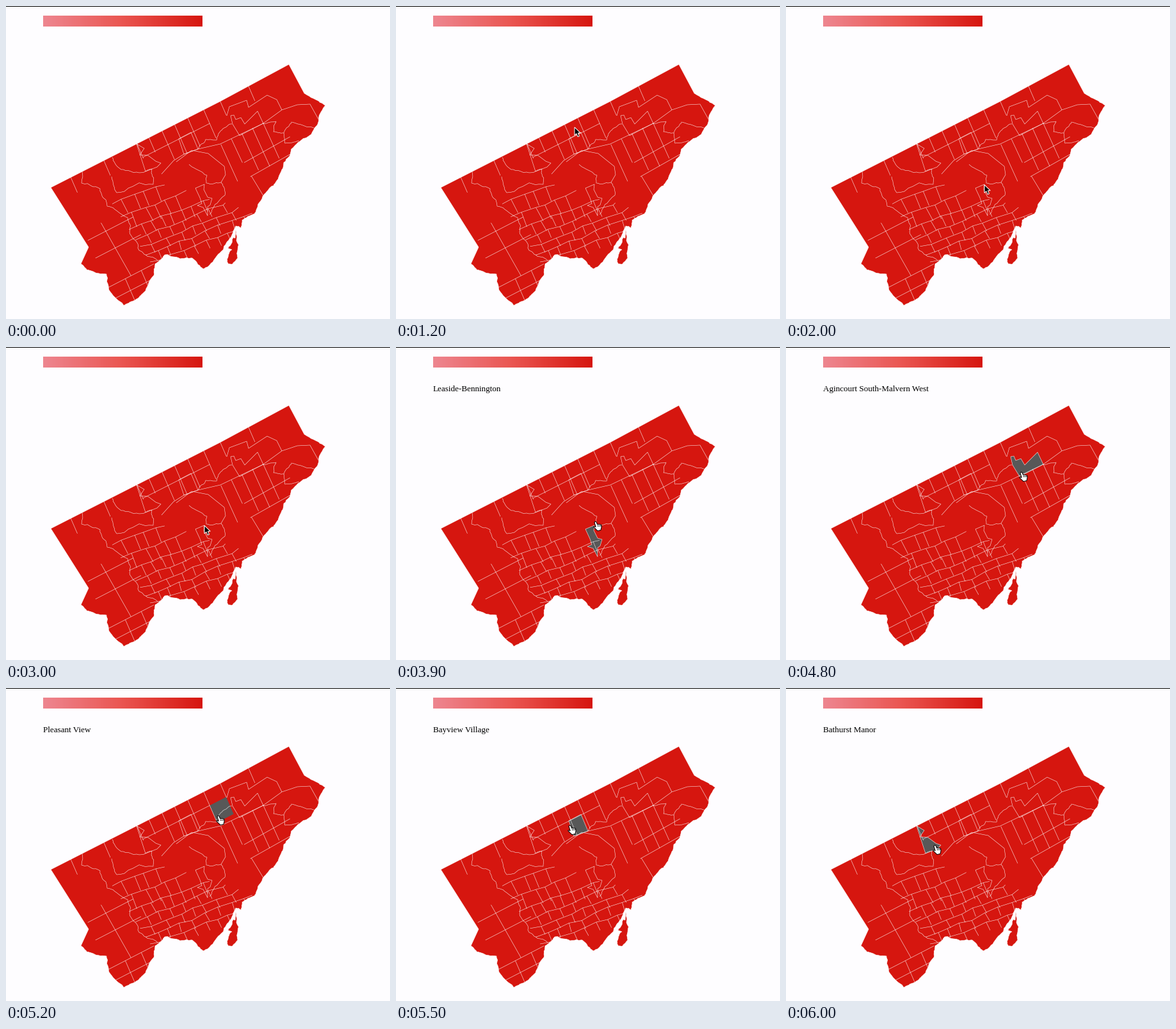
Write a matplotlib script that moves like this. It is 600 px wide and 488 px high and loops after 6.8 s.

```python
import matplotlib.pyplot as plt
import numpy as np
from matplotlib.animation import FuncAnimation
from matplotlib.collections import LineCollection
from matplotlib.colors import LinearSegmentedColormap
from matplotlib.patches import Polygon, Rectangle

W, H, DPI = 600, 488, 64
PX = 72 / DPI  # one pixel in points
RED, GREY, PAPER = "#d6160f", "#585858", "#fefdff"
FRAMES, STEP = 68, 100
rng = np.random.default_rng(4)

# Street frame: a runs along the northern border, b runs into the city
CORNER = np.array([70, 283])
AXES = np.array([[0.889, -0.458], [0.40, 0.917]])


def place(a, b):
    return CORNER + np.array([a, b]) @ AXES


def street(a0, b0, a1, b1):
    return np.array([place(a0, b0), place(a1, b1)])


def rough(pts, amp=0.06, passes=3):
    """Fractal line: shift each midpoint in proportion to its segment."""
    pts = np.array(pts, float)
    for _ in range(passes):
        span = np.diff(pts, axis=0)
        size = np.hypot(*span.T)[:, None]
        mid = pts[:-1] + span / 2 + rng.normal(0, amp, span.shape) * size
        out = np.empty((2 * len(pts) - 1, 2))
        out[::2], out[1::2] = pts, mid
        pts = out
    return pts


# City outline
border = [(129, 376), (70, 283), (204, 215), (334, 149), (442, 91), (466, 136)]
shore = [(466, 136), (484, 146), (499, 155), (488, 181), (477, 200),
         (452, 217), (434, 244), (425, 270), (418, 280), (401, 297),
         (388, 324), (369, 334), (367, 346), (359, 343), (351, 361),
         (336, 383), (318, 404), (308, 410), (291, 393), (272, 394),
         (248, 388), (233, 402), (231, 420), (218, 444), (208, 454),
         (184, 467), (161, 443), (157, 418), (140, 416), (117, 402)]
spit = [(359, 346), (361, 360), (362, 393), (347, 402), (347, 391),
        (353, 380), (347, 378), (355, 361), (358, 362)]

# Highways, creeks and valleys
highways = [
    [(243, 262), (262, 241), (278, 231), (300, 223), (335, 215), (402, 183),
     (431, 162), (455, 154), (475, 153), (489, 178)],
    [(266, 243), (290, 225), (316, 230), (341, 250), (343, 263), (336, 275)],
    [(345, 171), (349, 157), (376, 147), (379, 158), (408, 139), (423, 146),
     (431, 162)],
]
creeks = [
    [(119, 258), (118, 276), (147, 285), (158, 312), (190, 330), (193, 352),
     (206, 371), (208, 381), (237, 397)],
    [(166, 236), (180, 255), (204, 259), (228, 254), (230, 278), (173, 291),
     (165, 266)],
    [(286, 247), (314, 264), (313, 276), (336, 275), (342, 295), (318, 325)],
    [(402, 183), (422, 180), (418, 196), (434, 198), (446, 181), (481, 190)],
    [(434, 198), (436, 214), (458, 210)],
    [(353, 184), (335, 195), (329, 209), (312, 208), (300, 223)],
]

# Districts with a shape of their own
districts = {
    "Leaside-Bennington": [
        (296, 284), (310, 278), (309, 286), (315, 298), (322, 300),
        (319, 310), (315, 313), (315, 327), (308, 314), (299, 311),
        (306, 308), (303, 299)],
    "Agincourt South-Malvern West": [
        (351, 171), (356, 170), (359, 177), (367, 174), (373, 184),
        (393, 164), (402, 183), (365, 202), (354, 184)],
    "Bayview Village": [(270, 207), (289, 197), (300, 223), (278, 231)],
    "Bathurst Manor": [
        (204, 215), (216, 222), (209, 232), (222, 233), (234, 242),
        (242, 245), (236, 251), (218, 258)],
}

columns = np.array([35, 93, 151, 172, 195, 217, 240, 268, 297, 347])
rows = np.array([0, 25, 54, 90, 128])


def northern_blocks():
    for a in columns:
        yield street(a, 0, a, 50 if 190 < a < 290 else 26)
    yield street(151, 24, 268, 25)


def eastern_blocks():
    for a in np.linspace(271, 345, 5):
        yield street(a, 62, a + 1, rng.uniform(95, 130))
    for b in (104, 128):
        yield street(293, b, 375, b - 3)
    yield street(295, 128, 300, 165)


def western_blocks():
    for b in (100, 130, 180, 200):
        yield street(20, b, 100, b)
    for a in (50, 78):
        yield street(a, 180, a, 225)
    yield street(50, 85, 60, 180)


def southern_blocks():
    levels = np.array([66, 90, 114, 132, 146, 160, 174])
    for b, depth in zip(levels, np.append(np.diff(levels), 14)):
        start, end = 78 + (b - 66) / 6, 165 + (b - 66) * 1.15
        a = start + np.cumsum(rng.uniform(14, 26, 12))
        a = np.concatenate([[start], a[a < end], [end]])
        drift = b + 0.1 * (a - 75) + rng.normal(0, 1.5, len(a))
        yield np.array([place(*p) for p in zip(a, drift)])
        for x, y in zip(a[1:-1], drift[1:-1]):
            yield street(x, y, x + rng.normal(0, 1), y + depth)


def block_at(x, y):
    """Corners of the street block around a point."""
    a, b = (np.array([x, y]) - CORNER) @ np.linalg.inv(AXES)
    i = np.clip(np.searchsorted(columns, a), 1, len(columns) - 1)
    j = np.clip(np.searchsorted(rows, b), 1, len(rows) - 1)
    (a0, a1), (b0, b1) = columns[i - 1:i + 1], rows[j - 1:j + 1]
    return np.vstack([street(a0, b0, a1, b0), street(a1, b1, a0, b1)])


fig = plt.figure(figsize=(W / DPI, H / DPI), dpi=DPI, facecolor=PAPER)
ax = fig.add_axes([0, 0, 1, 1])
ax.axis("off")

ramp = LinearSegmentedColormap.from_list("ramp", ["#ee8690", "#ea5550", RED])
ax.imshow(np.linspace(0, 1, 248)[None, :], extent=(57.6, 306, 32.2, 15.5),
          cmap=ramp, aspect="auto")
ax.set_xlim(0, W)
ax.set_ylim(H, 0)
ax.add_patch(Rectangle((0, 0), W, 1, color="black", lw=0))

land = dict(facecolor=RED, edgecolor="white", lw=0.6 * PX)
city = ax.add_patch(Polygon(np.vstack([border, rough(shore)]), **land))
ax.add_patch(Polygon(rough(spit, 0.1), **land))
lit = ax.add_patch(Polygon(spit, facecolor=GREY, lw=0, zorder=2))

edges = [np.array(line) for line in highways]
edges += [rough(line, 0.07) for line in creeks]
edges += [np.array(shape + shape[:1]) for shape in districts.values()]
for blocks in (northern_blocks, eastern_blocks, western_blocks,
               southern_blocks):
    edges += blocks()
streets = LineCollection(edges, colors="white", linewidths=0.6 * PX,
                         alpha=0.85, zorder=3)
ax.add_collection(streets)
streets.set_clip_path(city)

label = ax.text(58, 69, "", family="Liberation Serif", size=13.15 * PX,
                color="black", va="baseline")

# Pointers, relative to the hot spot
arrow_shape = np.array([(0, 0), (0, 12.5), (2.9, 9.9), (5.1, 14.8),
                        (7.4, 13.9), (5.4, 9), (9.2, 8.9)])
hand_shape = np.array([(-1, 1.4), (0.4, 0), (2, 0.8), (3.6, 4.6), (6.2, 4.4),
                       (9.6, 5.1), (10.2, 8), (9, 13.5), (4, 14.6),
                       (-2.2, 8.6), (-1.4, 7.6), (1.2, 8.6)])
finger_gaps = [np.array([(x, 5.8), (x + 0.6, 8)]) for x in (4.2, 6.4, 8.6)]
arrow = ax.add_patch(Polygon(arrow_shape, facecolor="black", zorder=6,
                             edgecolor="white", lw=PX))
hand = ax.add_patch(Polygon(hand_shape, facecolor="white", zorder=6,
                            edgecolor="black", lw=PX))
gaps = ax.add_collection(LineCollection(finger_gaps, colors="black",
                                        linewidths=0.9 * PX, zorder=7))

# Pointer stops: frame, x, y
stops = np.array([
    (7, 228, 22), (12, 279, 189), (13, 294, 231), (16, 310, 279),
    (38, 310, 278), (39, 311, 272), (42, 338, 228), (43, 338, 228),
    (48, 367, 195), (50, 371, 189), (55, 271, 214), (60, 232, 245)])

# First frame of each highlighted district
hovers = [(39, "Leaside-Bennington"), (40, "Banbury-Don Mills"),
          (42, "Parkwoods-Donalda"), (45, "Tam O'Shanter-Sullivan"),
          (48, "Agincourt South-Malvern West"), (51, "Tam O'Shanter-Sullivan"),
          (52, "Pleasant View"), (53, "Don Valley Village"),
          (55, "Bayview Village"), (56, "Willowdale East"),
          (58, "Lansing-Westgate"), (60, "Bathurst Manor")]


def pointer(i):
    return np.array([np.interp(i, stops[:, 0], stops[:, k]) for k in (1, 2)])


def draw(i):
    spot = pointer(i)
    start, name = max((h for h in hovers if h[0] <= i), default=(0, ""))
    over = bool(name)
    label.set_text(name)
    lit.set_xy(districts.get(name, block_at(*pointer(start))))
    arrow.set_xy(arrow_shape + spot)
    arrow.set_visible(i >= stops[0, 0] and not over)
    hand.set_xy(hand_shape + spot)
    gaps.set_segments([g + spot for g in finger_gaps])
    for part in (lit, hand, gaps):
        part.set_visible(over)
    return label, lit, arrow, hand, gaps


anim = FuncAnimation(fig, draw, frames=FRAMES, interval=STEP, repeat=True,
                     repeat_delay=0, blit=False)
plt.show()
```
